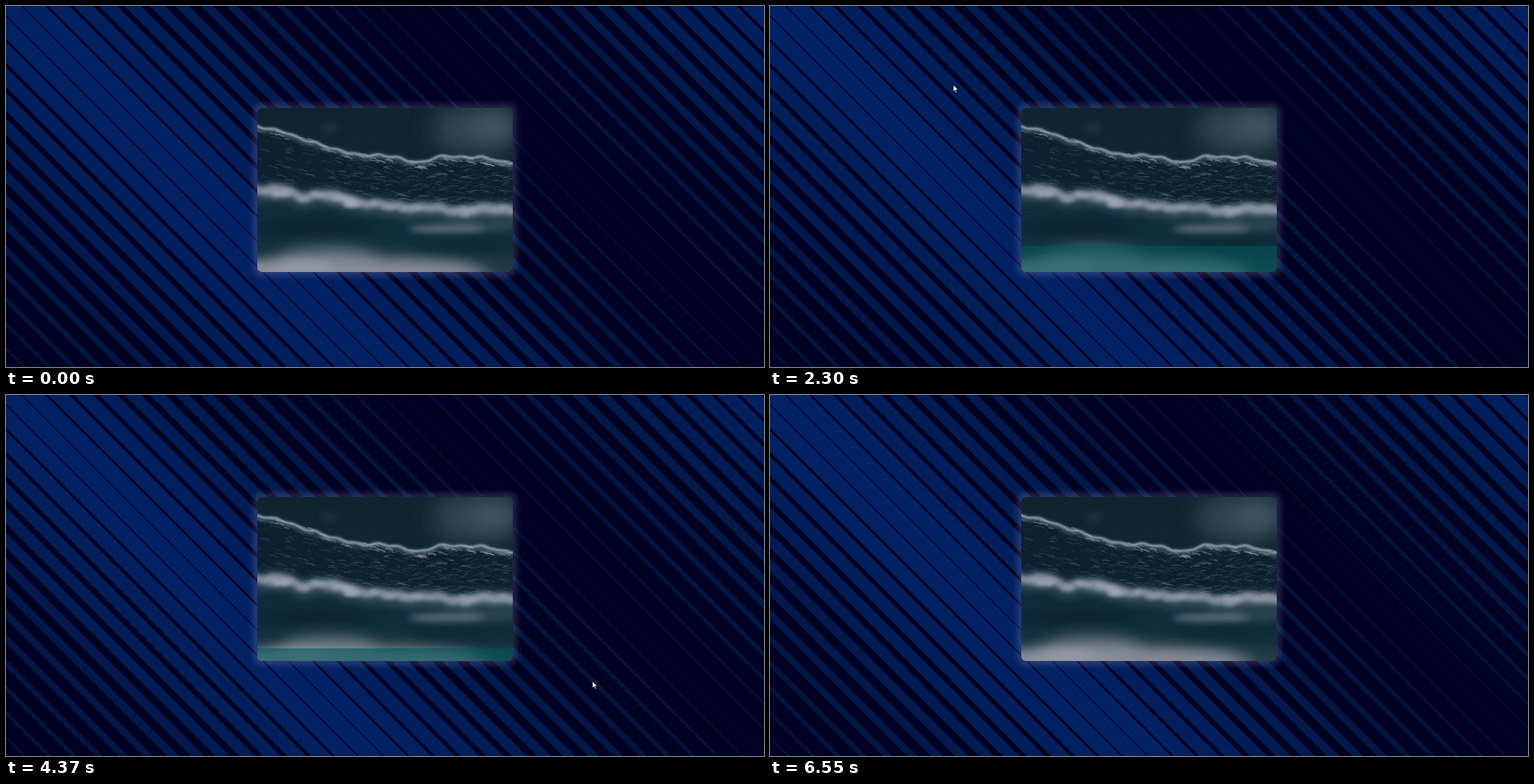
These frames come from a looping animation (1083x517 px, 7150 ms). An HTML page with a canvas:

```html
<!DOCTYPE html>
<html lang="en">
<head>
<meta charset="utf-8">
<title>Image caption hover</title>
<style>
  html, body { margin: 0; width: 100%; height: 100%; overflow: hidden; background: #000022; }
  canvas, svg { position: absolute; left: 0; top: 0; width: 1083px; height: 517px; display: block; }
  text { font-family: Lato, "Open Sans", sans-serif; fill: #fff; text-anchor: middle; }
</style>
</head>
<body>
<canvas id="scene" width="1083" height="517"></canvas>
<svg viewBox="0 0 1083 517">
  <clipPath id="card"><rect x="359" y="146" width="365" height="235" rx="7"/></clipPath>
  <g clip-path="url(#card)">
    <rect id="overlay" x="359" width="365" fill="#00565a" fill-opacity=".6"/>
  </g>
  <g id="caption">
    <text x="541.3" y="260.6" font-size="11.5">AMAZING CAPTION</text>
    <rect x="482.6" y="265.3" width="117.4" height="12.2" fill="#b88652"/>
    <text x="541.3" y="274.4" font-size="9.1" font-weight="700">you can write anything here</text>
  </g>
  <path id="cursor" d="M0 0V9.6L2.2 7.6 3.7 11.2 5.2 10.5 3.7 7H6.7Z" fill="#fff" stroke="#111" stroke-width=".7"/>
</svg>
<script>
const W = 1083, H = 517, LOOP = 7150;
const CARD = { x: 359, y: 146, w: 365, h: 235 };
const $ = id => document.getElementById(id);
const ctx = $('scene').getContext('2d');
const clamp = v => Math.max(0, Math.min(1, v));
const mix = (a, b, t) => a + (b - a) * t;

let seed = 7;
const random = () => (seed = seed * 16807 % 2147483647) / 2147483647;

function drawStripes() {
  const step = 25 * Math.SQRT2;
  ctx.fillStyle = '#000022';
  ctx.fillRect(0, 0, W, H);
  for (let k = -17; k <= 31; k++) {
    const x = 39.7 + step * k;
    const fade = 1 - Math.abs(Math.abs(x - 10) - 560) / 560;
    const half = Math.max(.5, (step - 1 - 33.5 * fade) / 2);
    ctx.fillStyle = `rgb(0,${mix(34, 17, fade)},${mix(102, 48, fade)})`;
    ctx.beginPath();
    ctx.moveTo(x - half, 0);
    ctx.lineTo(x + half, 0);
    ctx.lineTo(x + half + H, H);
    ctx.lineTo(x - half + H, H);
    ctx.fill();
  }
}

// Smooth curve height through a few [x, y] points
function curve(points) {
  return x => {
    let i = 1;
    while (i < points.length - 1 && x > points[i][0]) i++;
    const [a, b] = [points[i - 1], points[i]];
    const u = clamp((x - a[0]) / (b[0] - a[0]));
    return mix(a[1], b[1], u * u * (3 - 2 * u) * .5 + u * .5);
  };
}
const farCrest = curve([[359, 171], [384, 177], [415, 188], [440, 194], [470, 207], [515, 213],
  [560, 217], [592, 224], [632, 214], [670, 217], [724, 224]]);
const nearCrest = curve([[359, 260], [395, 263], [420, 271], [452, 267], [500, 278], [545, 284],
  [600, 287], [655, 292], [690, 288], [724, 289]]);

function blob(x, y, rx, ry, color, blur) {
  ctx.filter = `blur(${blur}px)`;
  ctx.fillStyle = color;
  ctx.beginPath();
  ctx.ellipse(x, y, rx, ry, 0, 0, 7);
  ctx.fill();
  ctx.filter = 'none';
}

function crestBand(crest, width, color, blur, dy = 0) {
  ctx.filter = `blur(${blur}px)`;
  ctx.strokeStyle = color;
  ctx.lineWidth = width;
  ctx.beginPath();
  for (let x = 345; x <= 740; x += 3)
    ctx.lineTo(x, crest(x) + dy + Math.sin(x * .21) * 1.2 + Math.sin(x * .09) * 1.4);
  ctx.stroke();
  ctx.filter = 'none';
}

function ripple(x, y, length, slope, alpha, width) {
  ctx.strokeStyle = `rgba(158,172,188,${alpha})`;
  ctx.lineWidth = width;
  ctx.beginPath();
  ctx.moveTo(x, y);
  ctx.quadraticCurveTo(x + length / 2, y + slope * length / 2 - 1 - random() * 2.5, x + length, y + slope * length);
  ctx.stroke();
}

function drawPhoto() {
  const { x, y, w, h } = CARD;
  ctx.filter = 'blur(4px)';
  ctx.fillStyle = 'rgba(190,170,215,.2)';
  ctx.beginPath();
  ctx.roundRect(x - 6, y - 6, w + 12, h + 12, 11);
  ctx.fill();
  ctx.filter = 'none';

  ctx.save();
  ctx.beginPath();
  ctx.roundRect(x, y, w, h, 7);
  ctx.clip();
  const sea = ctx.createLinearGradient(0, y, 0, y + h);
  [[0, '#0e2530'], [.3, '#10262f'], [.42, '#0b2030'], [.6, '#102c3b'], [.8, '#112f3d'], [1, '#243c48']]
    .forEach(([at, color]) => sea.addColorStop(at, color));
  ctx.fillStyle = sea;
  ctx.fillRect(x, y, w, h);

  // Spray in the sky
  blob(672, 176, 62, 34, 'rgba(72,94,112,.6)', 16);
  blob(700, 172, 34, 24, 'rgba(90,108,126,.35)', 12);
  blob(462, 175, 12, 8, 'rgba(50,75,88,.3)', 4);

  // Far wave
  ctx.fillStyle = '#0c2030';
  ctx.beginPath();
  for (let px = 355; px <= 730; px += 5) ctx.lineTo(px, farCrest(px) + 2);
  for (let px = 730; px >= 355; px -= 5) ctx.lineTo(px, nearCrest(px));
  ctx.fill();
  crestBand(farCrest, 7, 'rgba(125,142,158,.45)', 2.5, 2);
  crestBand(farCrest, 2.6, 'rgba(190,198,210,.75)', .8);
  for (let i = 0; i < 110; i++) {
    const px = 357 + random() * 370;
    ripple(px, farCrest(px) + random() * 10 - 1, 5 + random() * 9, .25, .15 + random() * .45, .6 + random());
  }
  for (let i = 0; i < 420; i++) {
    const px = 355 + 370 * Math.pow(random(), .65);
    const depth = random();
    const slope = mix(.28, random() < .5 ? -.35 : .2, (px - 355) / 370);
    ripple(px, mix(farCrest(px) + 6, nearCrest(px) - 3, depth), 4 + random() * 13, slope,
      .06 + random() * .26, .5 + random() * .7);
  }

  // Near wave and foam
  crestBand(nearCrest, 24, 'rgba(82,100,116,.55)', 6, 5);
  crestBand(nearCrest, 11, 'rgba(168,174,188,.7)', 3.2, 2);
  blob(388, 265, 20, 10, 'rgba(150,157,172,.55)', 4);
  blob(478, 276, 26, 7, 'rgba(165,170,184,.4)', 4);
  blob(690, 292, 40, 7, 'rgba(150,158,172,.4)', 4);
  for (let i = 0; i < 24; i++) {
    const px = 360 + random() * 362;
    blob(px, nearCrest(px) + random() * 12 - 3, 5 + random() * 9, 2 + random() * 3, 'rgba(180,186,198,.28)', 2);
  }
  blob(440, 318, 90, 13, 'rgba(9,32,44,.6)', 9);
  blob(630, 319, 55, 6, 'rgba(145,152,166,.6)', 5);
  blob(690, 316, 45, 7, 'rgba(110,124,138,.35)', 6);
  blob(662, 344, 85, 10, 'rgba(8,36,48,.6)', 9);
  blob(500, 384, 190, 23, 'rgba(160,162,172,.75)', 10);
  blob(460, 366, 72, 22, 'rgba(150,155,166,.55)', 11);
  blob(400, 374, 65, 12, 'rgba(165,166,175,.5)', 7);
  blob(590, 375, 80, 10, 'rgba(140,146,158,.4)', 8);
  ctx.restore();
}

// CSS "ease": cubic-bezier(.25, .1, .25, 1)
function ease(x) {
  if (x <= 0 || x >= 1) return clamp(x);
  const bezier = (s, p, q) => 3 * s * (1 - s) ** 2 * p + 3 * s * s * (1 - s) * q + s ** 3;
  let low = 0, high = 1;
  for (let i = 0; i < 24; i++) {
    const mid = (low + high) / 2;
    if (bezier(mid, .25, .25) < x) low = mid; else high = mid;
  }
  return bezier(low, .1, 1);
}
const easeOut = u => 1 - (1 - u) ** 3;
const sineOut = u => Math.sin(u * Math.PI / 2);
const linear = u => u;

const HOVERS = [[880, 2030], [3050, 4040], [5000, 6050]];
// [start, end, from, to, easing]
const MOVES = [
  [0, 470, [71, -40], [71, -40], linear],
  [470, 630, [71, -8], [71, -8], linear],
  [630, 1200, [71, -8], [430, 215], easeOut],
  [1980, 2280, [430, 215], [262, 113], easeOut],
  [2920, 3480, [275, 119], [603.5, 269.5], sineOut],
  [3970, 4290, [603.5, 269.5], [838, 410], easeOut],
  [4880, 5244, [838, 410], [676, 324], easeOut],
  [5990, 6210, [678, 326], [1052, 530], linear]
];

function cursorAt(t) {
  const [start, end, from, to, easing] = MOVES.filter(m => m[0] <= t).pop();
  const u = easing(clamp((t - start) / (end - start)));
  return [mix(from[0], to[0], u), mix(from[1], to[1], u)];
}

function render(t) {
  // The first hover pauses briefly at 1300 ms
  const clock = t >= 1300 && t < 1980 ? Math.max(1300, t - 80) : t;
  const [enter, leave] = HOVERS.filter(h => h[0] <= clock).pop() || [Infinity, Infinity];
  const leaving = clock >= leave;
  const cover = leaving ? 1 - ease((clock - leave) / 500) : ease((clock - enter) / 500);
  const shown = leaving ? 1 - ease((clock - leave) / 300) : ease((clock - enter - 250) / 300);

  const height = CARD.h * cover;
  $('overlay').setAttribute('y', CARD.y + CARD.h - height);
  $('overlay').setAttribute('height', height);
  $('caption').setAttribute('opacity', shown);
  $('caption').setAttribute('transform', `translate(0 ${-20 * (1 - shown)})`);
  $('cursor').setAttribute('transform', `translate(${cursorAt(t)})`);
}

drawStripes();
drawPhoto();
const begin = performance.now();
function tick() {
  render((performance.now() - begin) % LOOP);
  requestAnimationFrame(tick);
}
tick();
</script>
</body>
</html>
```
